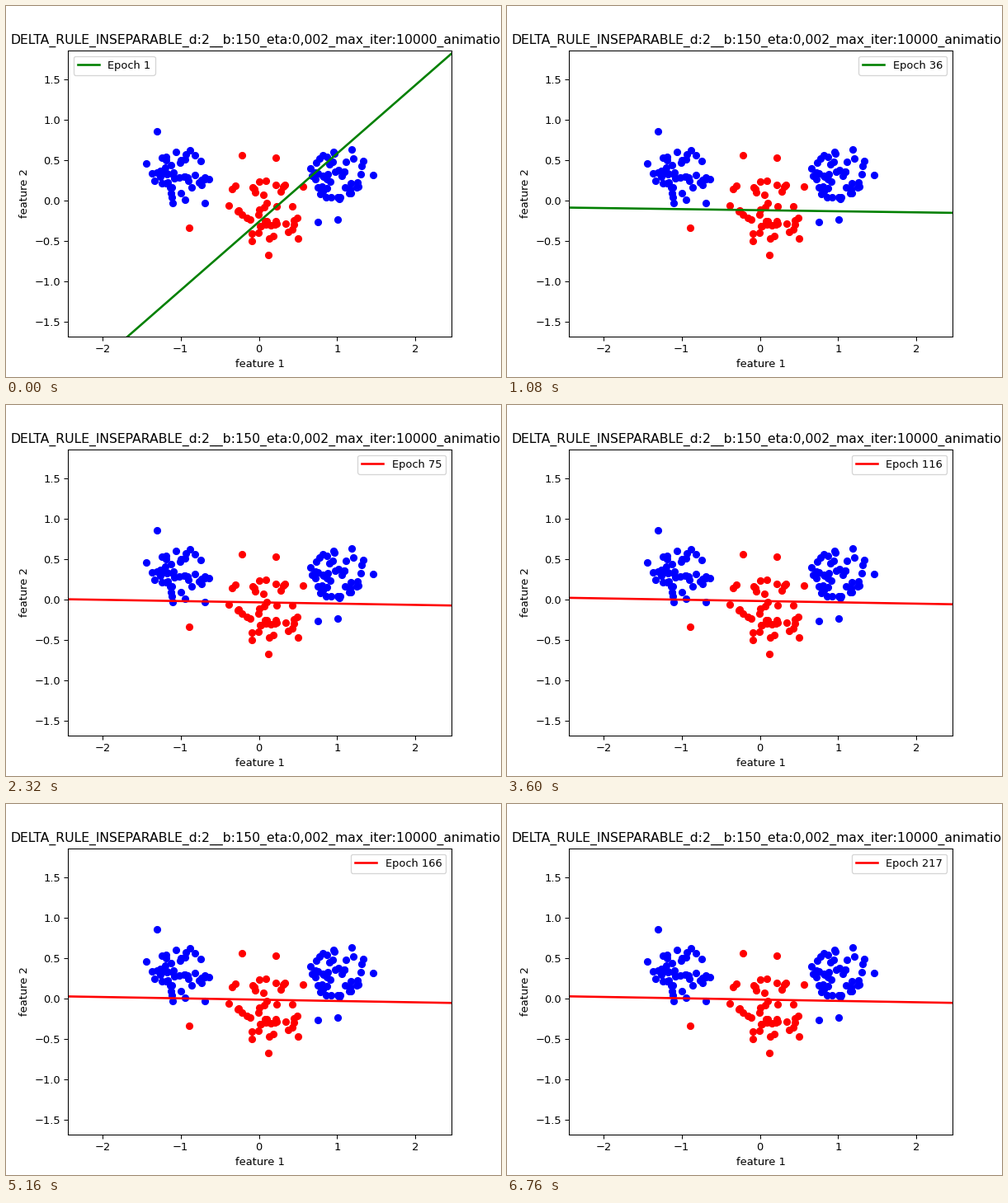
Recreate the animation shown at these times as a matplotlib script. Size 600 px wide and 450 px high, loop 6.8 s.

```python
import matplotlib.pyplot as plt
import numpy as np
from matplotlib.animation import FuncAnimation

FRAMES, INTERVAL, LAST_EPOCH = 170, 40, 217
SETTLED_EPOCH = 62
X_LIM, Y_LIM = (-2.44, 2.46), (-1.677, 1.853)

rng = np.random.default_rng(4)


def cluster(center, radii, rim, size=50):
    """Random cloud filling an ellipse, plus the outermost samples."""
    n = size - len(rim)
    angle = rng.uniform(0, 2 * np.pi, n)
    dist = rng.uniform(0, 1, n) ** 0.6
    cloud = np.column_stack([dist * np.cos(angle), dist * np.sin(angle)])
    return np.vstack([center + cloud * radii, rim])


def train(epochs):
    """Batch delta rule on (bias, w1, w2), scaled so that w2 settles at 1."""
    rate = 0.002 * 150
    moments = np.array([[1.0, -0.02, 0.153],
                        [-0.02, 0.75, -0.0176],
                        [0.153, -0.0176, 0.130]])
    best = np.array([0.0135, 0.0164, 1.0])
    w = np.array([-0.0406, 0.130, -0.1538])
    history = [w]
    for _ in range(epochs - 1):
        w = w + rate * moments @ (best - w)
        history.append(w)
    return history


left = cluster((-1.03, 0.33), (0.35, 0.34),
               [(-1.30, 0.85), (-1.44, 0.455), (-1.10, -0.03),
                (-0.69, -0.03), (-0.64, 0.265)])
right = cluster((1.03, 0.31), (0.36, 0.32),
                [(1.46, 0.315), (1.19, 0.635), (1.01, -0.235),
                 (0.75, -0.265), (0.66, 0.40)])
middle = cluster((0.02, -0.12), (0.48, 0.44),
                 [(-0.22, 0.555), (0.22, 0.525), (-0.89, -0.34),
                  (0.12, -0.675), (0.50, -0.47), (0.56, 0.17)])
weights = train(LAST_EPOCH)

fig, ax = plt.subplots(figsize=(6.4, 4.8), dpi=93.75)
ax.set_title("DELTA_RULE_INSEPARABLE_d:2__b:150_eta:0,002_max_iter:10000_animation")
ax.set(xlim=X_LIM, ylim=Y_LIM, xlabel="feature 1", ylabel="feature 2")
for points, color in ((left, "blue"), (right, "blue"), (middle, "red")):
    ax.plot(*points.T, "o", color=color)
xs = np.array(X_LIM)
boundary, = ax.plot(xs, xs, lw=2)


def update(i):
    epoch = 1 + round(i * (LAST_EPOCH - 1) / (FRAMES - 1))
    bias, w1, w2 = weights[epoch - 1]
    boundary.set_ydata(-(bias + w1 * xs) / w2)
    boundary.set_color("green" if epoch < SETTLED_EPOCH else "red")
    boundary.set_label(f"Epoch {epoch}")
    ax.legend(loc="best")
    return boundary,


anim = FuncAnimation(fig, update, frames=FRAMES, interval=INTERVAL,
                     repeat=True, repeat_delay=0)
plt.show()
```
